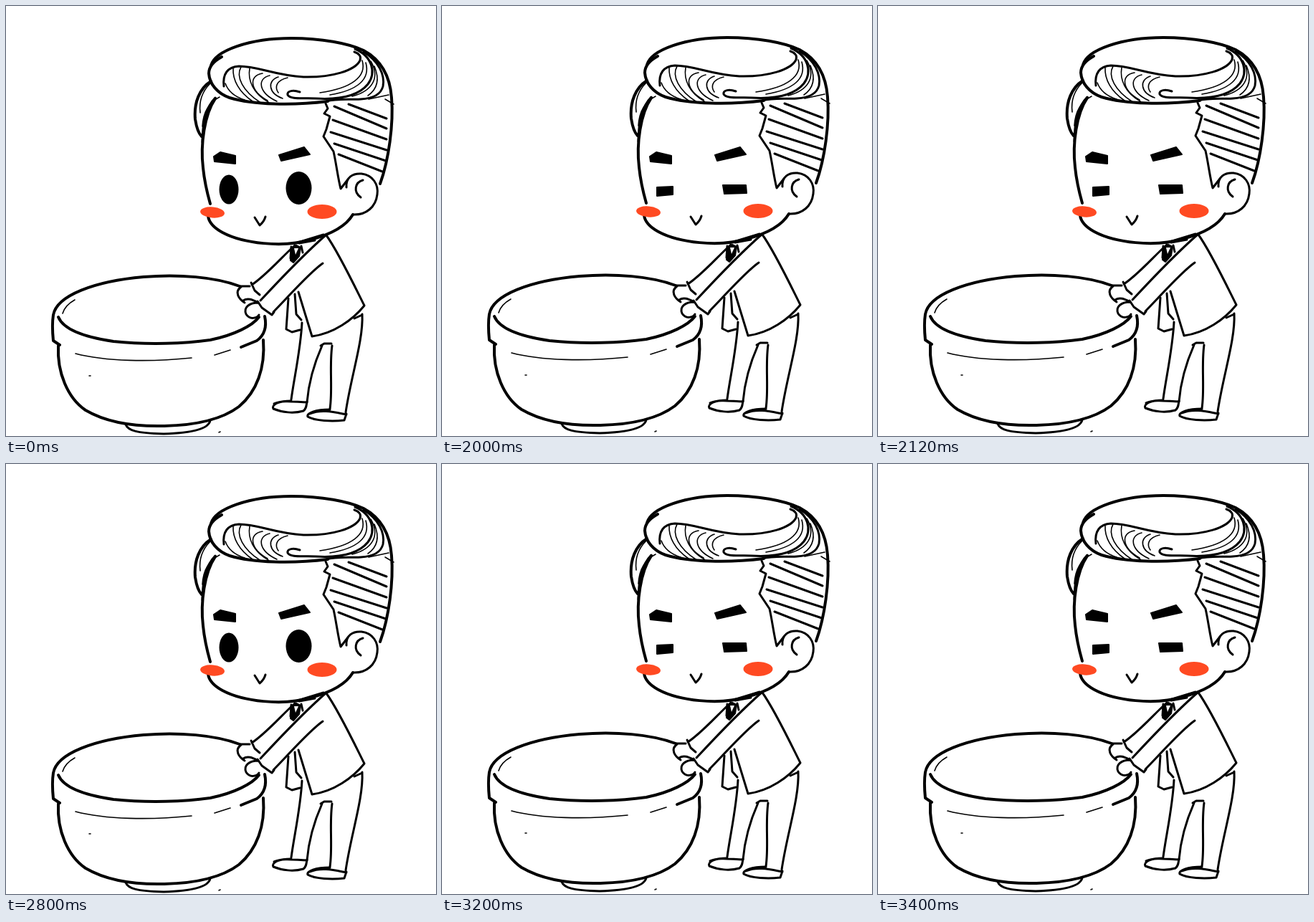
An HTML page that plays this animation: 600x600 px, repeating every 3.5 s.

```html
<!DOCTYPE html>
<html lang="en">
<head>
<meta charset="utf-8">
<title>Blink</title>
<style>
  html, body { margin: 0; width: 100%; height: 100%; overflow: hidden; background: #fff; }
  svg { display: block; width: 600px; height: 600px; }
  .ink { fill: none; stroke: #000; stroke-width: 4; stroke-linecap: round; stroke-linejoin: round; }
  .mid { stroke-width: 3; }
  .thin { stroke-width: 1.6; }
  .solid { stroke: #000; stroke-width: 2; stroke-linejoin: round; }
  .cheek { fill: #ff4a22; }
  .art { animation: nudge 3500ms step-end infinite; }
  .open { animation: open 3500ms step-end infinite; }
  .shut { animation: shut 3500ms step-end infinite; }
  @keyframes nudge {
    0%, 62.857%, 94.286% { transform: none; }
    57.143%, 91.429%, 97.143% { transform: translateY(-1px); }
  }
  @keyframes open {
    0%, 62.857%, 94.286% { opacity: 1; }
    57.143%, 91.429%, 97.143% { opacity: 0; }
  }
  @keyframes shut {
    0%, 62.857%, 94.286% { opacity: 0; }
    57.143%, 91.429%, 97.143% { opacity: 1; }
  }
</style>
</head>
<body>
<svg viewBox="0 0 600 600">
  <g class="art">
    <g id="hair" class="ink">
      <path d="M301 71C290 77 283 85 283 94C284 109 295 122 312 128C345 138 400 139 449 133"/>
      <path d="M286 83C292 62 340 45 398 45C440 45 478 52 499 62C525 76 536 100 538 128C541 165 534 215 522 248"/>
      <path d="M286 105C270 115 262 135 264 158C266 171 269 178 273 182"/>
      <g class="mid">
        <path d="M304 112C302 95 309 85 325 84C352 84 375 97 415 99C455 100 487 90 494 76C496 70 492 66 486 64"/>
        <path d="M487 60C511 70 517 93 505 109C492 125 465 131 432 129C415 128 397 131 393 124C392 118 401 117 410 120"/>
        <path d="M499 64C520 77 529 96 526 112C523 124 512 129 495 130C478 131 460 129 447 133"/>
        <path d="M292 128C279 141 274 163 274 190"/>
      </g>
      <g class="thin">
        <path d="M317 87C316 103 325 120 344 133M328 85C320 99 331 119 354 134M340 87C337 104 345 122 366 134"/>
        <path d="M358 94C338 97 340 118 365 132M368 97C350 101 352 121 378 133M380 99C364 104 366 122 386 129M393 100C376 104 375 114 380 121M306 108C310 119 320 127 333 131"/>
        <path d="M497 76C504 99 481 115 438 121M502 79C509 103 489 118 452 124M509 77C523 101 510 119 483 126M514 84C522 103 518 116 505 125"/>
        <path d="M285 108C274 119 269 133 271 149M298 127C282 135 275 151 274 168M506 130L534 124M529 130L541 137"/>
      </g>
      <g class="mid">
        <path d="M478 137L531 157M458 140L531 171M456 159L531 186M453 176L531 201M458 192L530 216M464 207L525 231"/>
        <path d="M446 136L449 143L444 150L452 154L447 172L443 182L457 203C461 221 463 239 467 255L477 242"/>
      </g>
    </g>

    <g id="head" class="ink">
      <path d="M292 129C277 151 271 193 275 226C277 246 281 262 285 276M282 293C283 302 291 310 302 316C330 331 386 338 425 326C452 319 474 308 484 291"/>
      <path class="mid" d="M475 253C474 239 484 233 496 234C512 236 520 249 518 263C516 280 503 292 484 291"/>
      <path class="mid" d="M498 243C487 246 484 259 495 267M347 295L354 306Q360 301 362 294"/>
    </g>
    <ellipse class="cheek" cx="288" cy="288" rx="17" ry="7.5" transform="rotate(5 288 288)"/>
    <ellipse class="cheek" cx="441" cy="287" rx="20.5" ry="10"/>

    <g id="body" class="ink mid">
      <path d="M403 334C386 349 363 376 343 389M342 386L347 397L354 403"/>
      <path d="M447 319C423 340 381 383 355 411M442 359C422 373 393 407 373 427"/>
      <path d="M447 320C463 342 484 386 500 418C484 438 457 457 427 461L408 399"/>
      <path d="M407 330L443 319M409 331L431 327M398 336L397 352M412 335L414 344"/>
      <path d="M394 408L391 451L399 455L410 452M403 402L405 430L412 438"/>
      <path d="M328 392C318 399 325 409 333 414M326 391L340 391M331 411C338 406 346 411 352 414"/>
      <path d="M352 414C339 414 331 421 335 430C340 438 350 436 353 431M351 412L357 421L371 431L374 427"/>
      <path d="M413 442C411 480 402 519 398 549M441 474C429 501 422 529 420 553M439 474L444 471L454 471M455 474C451 503 456 535 452 562M497 430C499 466 481 518 474 567M486 436L497 431"/>
      <path d="M398 551C381 551 370 556 373 562C385 567 401 569 415 565C419 562 419 558 420 552M374 555C388 549 405 553 420 553"/>
      <path d="M452 563C432 563 419 568 421 573C431 579 455 580 472 578L475 569M424 569C440 562 459 567 475 570"/>
    </g>
    <path class="solid" d="M399 338L405 334L411 337L409 349L401 358L397 355Z"/>
    <path fill="#fff" d="M402 338L408 338L404 347Z"/>

    <g id="bowl" class="ink">
      <path d="M326 391C292 378 241 374 192 378C123 384 71 404 66 431C64 444 65 457 66 467L75 473"/>
      <path d="M73 434C80 451 109 462 150 468C199 473 250 471 285 466C319 459 344 446 353 434"/>
      <path d="M361 433C364 447 361 459 350 467L328 476"/>
      <path d="M73 474C71 511 86 547 111 564C140 581 181 587 221 586C265 585 301 577 325 559C350 538 362 505 359 466"/>
      <path class="mid" d="M167 584C170 592 181 596 220 597C257 596 283 591 285 578"/>
      <path class="thin" d="M96 410C87 415 81 422 79 429M97 485C139 496 201 497 259 491M291 487L313 480M116 516L118 516M297 595L299 594"/>
    </g>
  </g>

  <path class="solid" d="M290 210L299 204L320 209L320 220L291 217Z"/>
  <path class="solid" d="M381 208L416 197L424 207L384 216Z"/>
  <g class="open">
    <ellipse cx="311" cy="256" rx="13.5" ry="20.5"/>
    <ellipse cx="408.500" cy="254" rx="18" ry="23"/>
  </g>
  <g class="shut">
    <path class="solid" d="M300 253L322 252L322 263L300 265Z"/>
    <path class="solid" d="M392 250L424 250L425 261L394 262Z"/>
  </g>
</svg>
</body>
</html>
```
